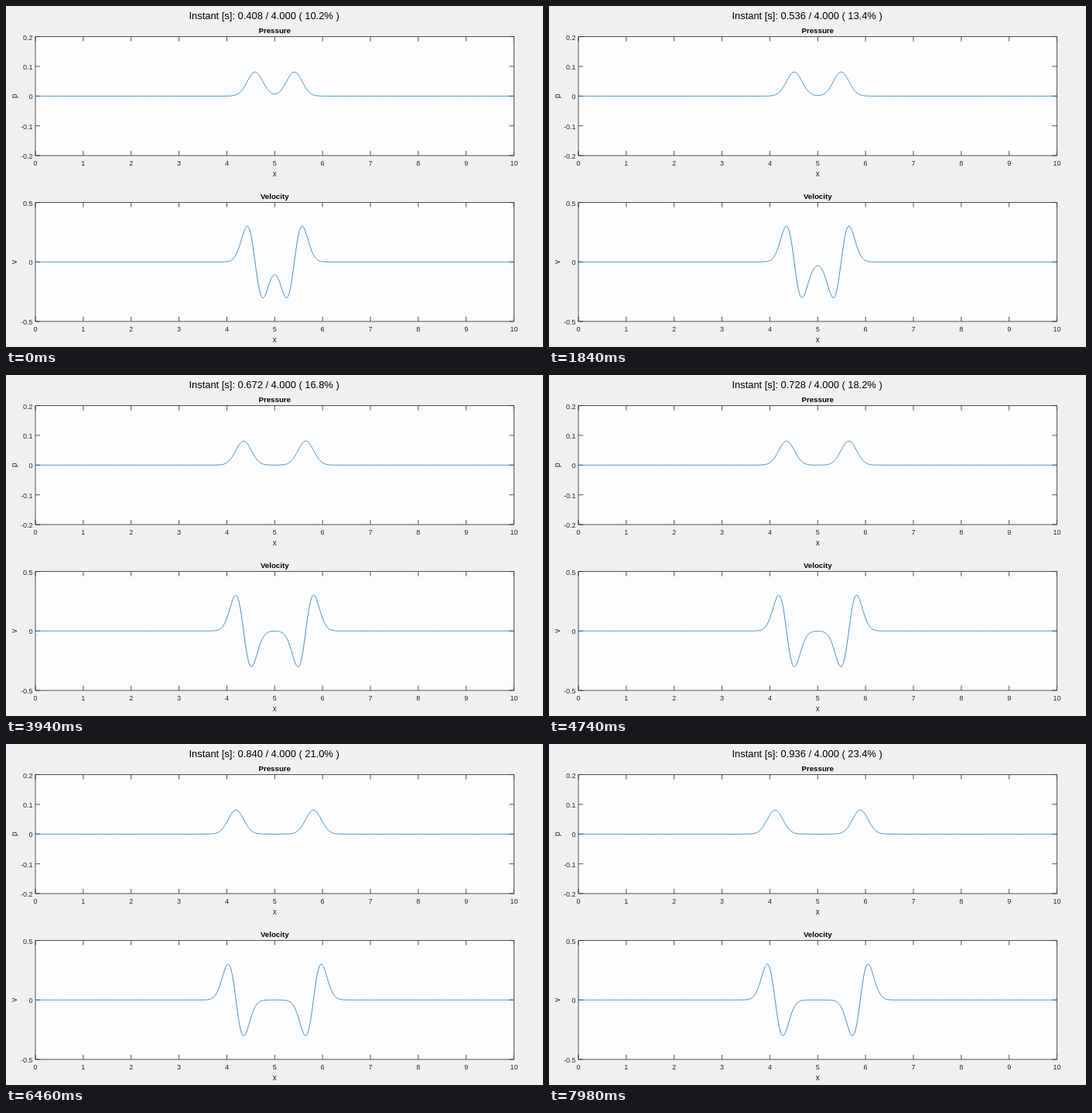
Animation, 694 px wide and 440 px high, one loop 8 s. Source, as an HTML page:

```html
<!DOCTYPE html>
<html lang="en">
<head>
<meta charset="utf-8">
<title>Pressure and velocity waves</title>
<style>
  html, body { margin: 0; width: 100%; height: 100%; overflow: hidden; background: #f0f0f0; }
  svg { display: block; width: 694px; height: 440px; }
  text { font: 9px "Liberation Sans", Arial, sans-serif; fill: #262626; white-space: pre; }
  .clock { font-size: 12.9px; fill: #000; }
  .title { font-size: 9.7px; font-weight: bold; fill: #000; }
  .label { font-size: 10px; }
  .middle { text-anchor: middle; }
  .end { text-anchor: end; }
  .box { fill: #fdfdfd; }
  .axes { fill: none; stroke: #262626; stroke-width: 0.8; }
  .curve { fill: none; stroke: #0072bd; stroke-width: 0.75; stroke-linejoin: round; }
</style>
</head>
<body>
<svg id="stage" viewBox="0 0 694 440"></svg>
<script>
const LOOP = 8000;
const LEFT = 38, WIDTH = 618.5, HEIGHT = 153.5, TICK = 6.2;
const AMP = 0.081, SIGMA = 0.163;
const stage = document.getElementById('stage');

function add(tag, attrs, content = '') {
  const node = document.createElementNS('http://www.w3.org/2000/svg', tag);
  for (const key in attrs) node.setAttribute(key, attrs[key]);
  node.textContent = content;
  return stage.appendChild(node);
}

const toX = x => LEFT + x * WIDTH / 10;

function makePlot(top, limit, yTicks, title, yName, wave) {
  const bottom = top + HEIGHT, right = LEFT + WIDTH, centre = top + HEIGHT / 2;
  const toY = v => centre - v / limit * HEIGHT / 2;
  add('rect', { class: 'box', x: LEFT, y: top, width: WIDTH, height: HEIGHT });

  let d = `M${LEFT} ${top}H${right}V${bottom}H${LEFT}Z`;
  for (let i = 0; i <= 10; i++) {
    const x = toX(i);
    d += `M${x} ${top}v${TICK}M${x} ${bottom}v${-TICK}`;
    add('text', { class: 'middle', x, y: bottom + 13.2 }, i);
  }
  for (const v of yTicks) {
    const y = toY(v);
    d += `M${LEFT} ${y}h${TICK}M${right} ${y}h${-TICK}`;
    add('text', { class: 'end', x: 34.5, y: y + 4 }, v);
  }
  add('path', { class: 'axes', d });

  const mid = toX(5);
  add('text', { class: 'title middle', x: mid, y: top - 4.7 }, title);
  add('text', { class: 'label middle', x: mid, y: bottom + 26.5 }, 'x');
  add('text', { class: 'label middle', transform: `translate(13.5 ${centre}) rotate(-90)` }, yName);

  const curve = add('path', { class: 'curve' });
  return shift => {
    let points = '';
    for (let i = 0; i <= 500; i++) {
      const x = i / 50;
      points += `${i ? 'L' : 'M'}${toX(x).toFixed(2)} ${toY(wave(x - 5, shift)).toFixed(2)}`;
    }
    curve.setAttribute('d', points);
  };
}

const bell = x => AMP * Math.exp(-x * x / (2 * SIGMA * SIGMA));
const slope = x => -x / (SIGMA * SIGMA) * bell(x);

const plots = [
  makePlot(39.5, 0.2, [0.2, 0.1, 0, -0.1, -0.2], 'Pressure', 'p',
    (x, s) => bell(x + s) + bell(x - s)),
  makePlot(253.5, 0.5, [0.5, 0, -0.5], 'Velocity', 'v',
    (x, s) => slope(x + s) - slope(x - s))
];
const clock = add('text', { class: 'clock', x: 236.5, y: 17.2 });

// Ticks last 100, 20 and 20 ms in turn, starting with a single 20 ms one.
function tickAt(ms) {
  if (ms < 20) return 0;
  const rest = (ms - 20) % 140;
  return 1 + 3 * Math.floor((ms - 20) / 140) + (rest < 100 ? 0 : rest < 120 ? 1 : 2);
}

// Ten clock steps per cycle; the curves are redrawn only in the longer first one.
function stateAt(ms) {
  const tick = tickAt(ms) + 3;
  const cycle = Math.floor(tick / 26), phase = tick % 26;
  const step = phase < 5 ? 0 : 1 + Math.floor((phase - 5) * 9 / 21);
  return {
    time: 0.408 + 0.008 * (10 * cycle + step),
    shift: 0.41 + 0.08 * (phase < 2 ? cycle - 1 : cycle)
  };
}

let shownShift;
function render(ms) {
  const { time, shift } = stateAt(ms % LOOP);
  clock.textContent = `Instant [s]: ${time.toFixed(3)} / 4.000 ( ${(time * 25).toFixed(1)}% )`;
  if (shift !== shownShift) plots.forEach(draw => draw(shift));
  shownShift = shift;
}

const start = performance.now();
function loop() {
  render(performance.now() - start);
  requestAnimationFrame(loop);
}
loop();
</script>
</body>
</html>
```
